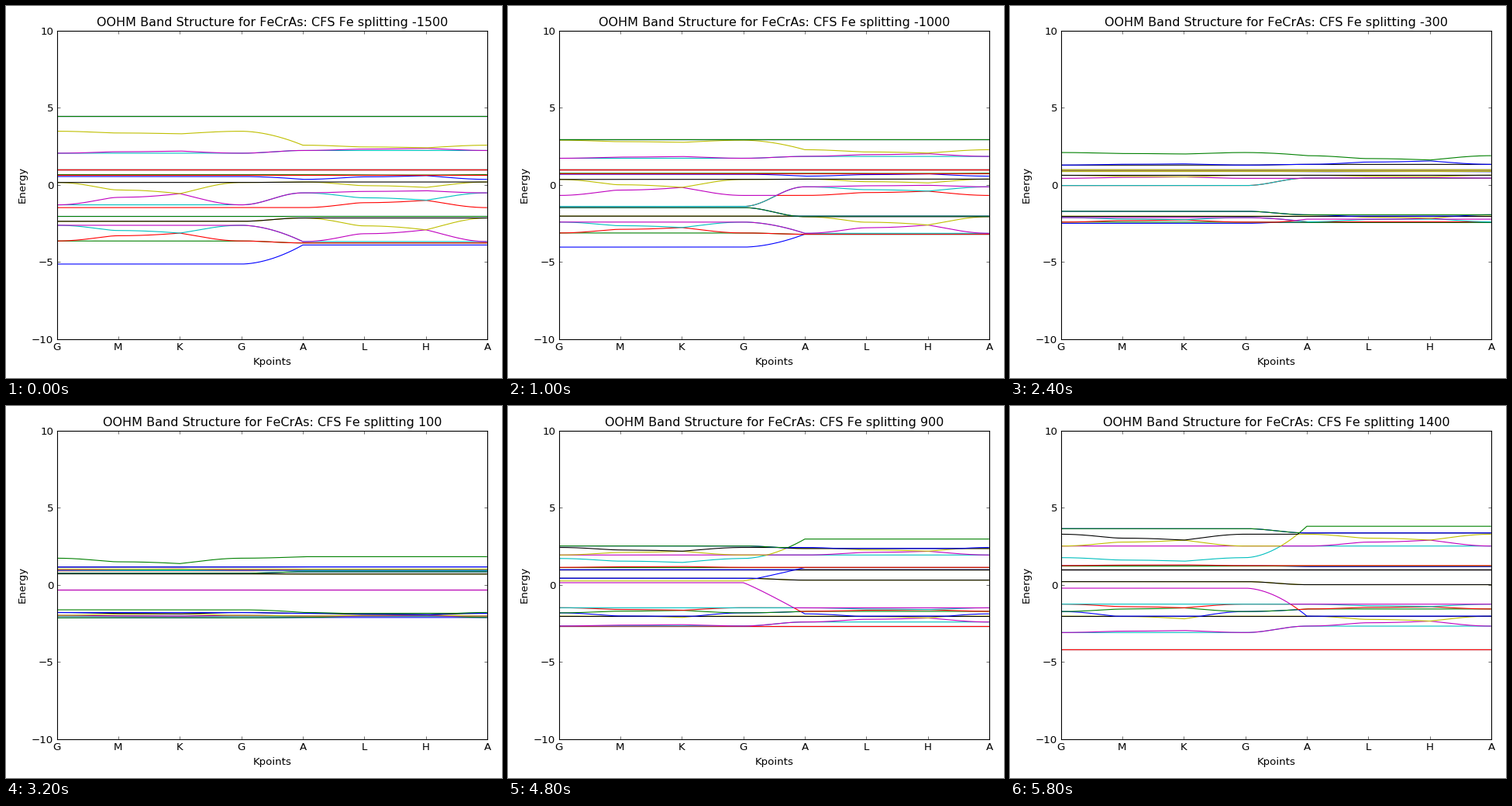
Animation of 640 by 480 pixels, one loop 6 s. Source, as a matplotlib script:

```python
import numpy as np
import matplotlib.pyplot as plt
from matplotlib.animation import FuncAnimation

plt.rcParams.update({
    "font.family": "DejaVu Sans", "font.size": 12, "text.kerning_factor": 6,
    "axes.titlesize": 14.4, "axes.titlepad": 5, "axes.labelpad": 5,
    "axes.linewidth": 1.0, "lines.linewidth": 1.0,
    "xtick.top": True, "ytick.right": True,
})

# k path G M K G A L H A, as phases of a honeycomb lattice
x = np.arange(700) / 100
nodes = np.arange(8)
ka = np.interp(x, nodes, np.pi * np.array([0, 1, 2 / 3, 0] * 2))
kb = np.interp(x, nodes, np.pi * np.array([0, 1, 4 / 3, 0] * 2))
s2 = 3 + 2 * np.cos(ka) + 2 * np.cos(kb) + 2 * np.cos(ka - kb)
close = 1 - np.sqrt(np.clip(s2, 0, None)) / 3   # 0 at G, 1 at K
lower = x < 3.5
z = np.clip(x - 3, 0, 1)
smooth = (1 - np.cos(np.pi * z)) / 2

# name: (degeneracy, energy near zero splitting,
#        slopes left and right of it at G, the same at A)
LEVELS = {
    "rise": (1, -1.62, (-2.2, 2.2), (-1.42, -.3)),
    "fall": (1, 1.03, (-.3, -.95), (-.42, .12)),
    "top": (1, 1.05, (-1.58, 1.72), (-1.58, 1.72)),
    "arc": (1, 1.6, (1.17, .12), (.6, 1.68)),
    "deep": (2, -1.95, (-1.05, -.87), (-1.13, -.55)),
    "mid": (2, -1.95, (-.42, .17), (-1.08, .3)),
    "low": (2, -1.88, (.36, .48), (-.17, .48)),
    "climb": (2, .72, (-1.93, 2.25), (-.78, 2.03)),
    "hat": (2, .8, (-.4, -.45), (-.38, -.6)),
    "still": (2, .95, (-.18, .23), (-.18, .23)),
    "bowl": (2, .97, (.67, 1.18), (.78, 1.18)),
}


def ramp(u):
    return (u + np.hypot(u, 0.2)) / 2


def energies(d, plane):
    """Level energies at G (plane 0) or A (plane 1)."""
    u = d - 0.1
    e = {}
    for name, (_, base, *slopes) in LEVELS.items():
        left, right = slopes[plane]
        e[name] = base + left * ramp(-u) + right * ramp(u)
    for a, b in (("low", "climb"), ("rise", "fall")):   # these repel
        e[a], e[b] = sorted((e[a], e[b]))
    return e


def pairs(d, plane, e):
    """Levels that approach each other at K or H: lower, upper, shares."""
    if d < 0.1 and plane == 0:
        return [("deep", "mid", .5, .5), ("bowl", "arc", .1, .12),
                (max("climb", "top", key=e.get), "hat", .5, .5)]
    if d < 0.1:
        return [("mid", "low", .5, .5), ("top", "climb", .5, .5),
                ("climb", "hat", .2, .5), ("fall", "still", .8, .1),
                ("bowl", "arc", .4, .5)]
    shared = [("mid", "low", .5, .5), ("bowl", "top", .5, .5)]
    if plane == 0:
        return shared + [("deep", "mid", .1, .35), ("still", "arc", .1, .45)]
    return shared + [("deep", "rise", .5, .5)]


def dispersion(d, plane, e):
    """Shift at K or H of each member of each level."""
    shift = {name: [0] * LEVELS[name][0] for name in e}
    for lo, hi, up, down in pairs(d, plane, e):
        gap = max(0, e[hi] - e[lo])
        shift[lo][-1] += up * gap
        shift[hi][0] -= down * gap
    return shift


def bands(d):
    """Thirty bands, lowest first, for a splitting of d eV."""
    g, a = energies(d, 0), energies(d, 1)
    shift_g, shift_a = dispersion(d, 0, g), dispersion(d, 1, a)
    dirac = z ** (1 + 0.8 * min(1, g["fall"] - g["rise"]))
    weight = {"rise": dirac, "fall": dirac, "arc": z ** 1.8, "mid": z ** 1.8}
    rows = [np.full(x.size, e) for e in [.98] * 7 + [-2.03] * 2 + [-2.98 * d - .01] * 3]
    for name in LEVELS:
        base = g[name] + (a[name] - g[name]) * weight.get(name, smooth)
        for sg, sa in zip(shift_g[name], shift_a[name]):
            rows.append(base + close * np.where(lower, sg, sa))
    return np.sort(rows, axis=0)


fig, ax = plt.subplots(figsize=(8, 6), dpi=80, facecolor="white")
ax.set(xlim=(0, 7), ylim=(-10, 10), xlabel="Kpoints", ylabel="Energy")
ax.set_xticks(nodes, list("GMKGALHA"))
ax.set_yticks(range(-10, 11, 5))
ax.tick_params(direction="in", length=4, width=0.5, pad=4)
title = ax.set_title("")
lines = [ax.plot([], [], color="bgrcmyk"[i % 7])[0] for i in range(30)]


def update(i):
    split = -1500 + 100 * i
    title.set_text(f"OOHM Band Structure for FeCrAs: CFS Fe splitting {split}")
    for line, e in zip(lines, bands(split / 1000)):
        line.set_data(x, e)
    return [title, *lines]


update(0)
fig.tight_layout()
anim = FuncAnimation(fig, update, frames=30, interval=200, repeat=True,
                     repeat_delay=0, blit=False)
plt.show()
```
